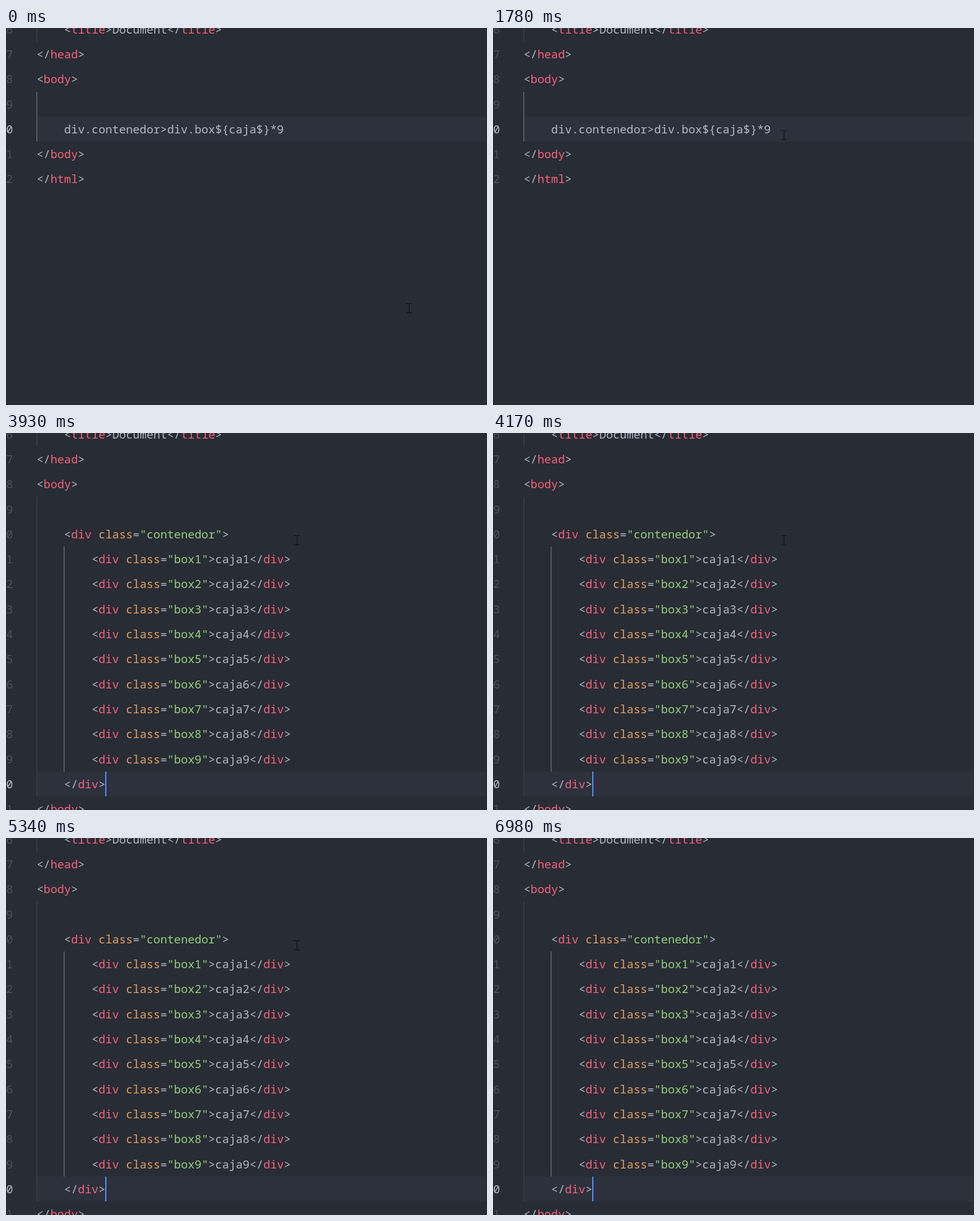
An HTML page with a canvas for the animation above (7030 ms loop, 776 by 608 pixels).

```html
<!DOCTYPE html>
<html lang="es">
<head>
<meta charset="utf-8">
<title>Editor</title>
<style>
  html, body { margin: 0; width: 776px; height: 608px; overflow: hidden; background: #282c34; }
  canvas { display: block; }
</style>
</head>
<body>
<canvas id="stage" width="776" height="608"></canvas>
<script>
const ctx = document.getElementById('stage').getContext('2d');
const W = 776, H = 608, LOOP = 7030;
const LEFT = 49.5, CHAR = 11.08, ROW = 40.3, SIZE = CHAR / 0.6;
const FONT = '"Noto Sans Mono", "DejaVu Sans Mono", monospace';
const POPUP_AT = 3100, EXPAND_AT = 3900, BLINK = 500;
const COLOR = {
  back: '#282c34', row: '#2c313c', plain: '#b2b9c6', tag: '#f4627a',
  attr: '#e2a066', string: '#94d07f', number: '#495162', active: '#b8bec9',
  guide: '#3b4048', guideOn: '#656a73', caret: '#528bff', popup: '#21252b'
};
const ABBR = 'div.contenedor>div.box${caja$}*9';

const rowTop = n => Math.round(143 + ROW * (n - 10));
const baseline = n => Math.round(169.85 + ROW * (n - 10));
const colX = c => LEFT + CHAR * c;

function rect(x, y, w, h, color) {
  ctx.fillStyle = color;
  ctx.fillRect(x, y, w, h);
}

function text(str, x, y, color, weight = 500) {
  ctx.font = `${weight} ${SIZE}px ${FONT}`;
  ctx.fillStyle = color;
  ctx.fillText(str, x, y);
}

// Splits markup into coloured tokens.
function code(n, col, line, markup = true) {
  if (!markup) return text(line, colX(col), baseline(n), COLOR.plain);
  const parts = line.match(/<\/?|"[^"]*"|[^<>"=\s]+|[>=]|\s+/g);
  let inTag = false, named = false;
  for (const part of parts) {
    let color = COLOR.plain;
    if (part[0] === '<') { inTag = true; named = false; }
    else if (part === '>') inTag = false;
    else if (part[0] === '"') color = COLOR.string;
    else if (inTag && part !== '=' && part.trim()) {
      color = named ? COLOR.attr : COLOR.tag;
      named = true;
    }
    text(part, colX(col), baseline(n), color);
    col += part.length;
  }
}

function guide(col, from, to, color) {
  const y = rowTop(from);
  rect(Math.floor(colX(col)), y, 1.4, rowTop(to + 1) - y, color);
}

function page(expanded) {
  const current = expanded ? 20 : 10, last = expanded ? 21 : 12;
  rect(50, rowTop(current), 724, 40, COLOR.row);
  for (let n = 6; n <= last; n++) {
    text(n % 10, 0.3, baseline(n), n === current ? COLOR.active : COLOR.number);
  }
  guide(0, 6, 6, COLOR.guide);
  guide(0, 9, current, expanded ? COLOR.guide : COLOR.guideOn);
  code(6, 4, '<title>Document</title>');
  code(7, 0, '</head>');
  code(8, 0, '<body>');
  if (expanded) {
    guide(4, 11, 19, COLOR.guideOn);
    code(10, 4, '<div class="contenedor">');
    for (let i = 1; i <= 9; i++) code(10 + i, 8, `<div class="box${i}">caja${i}</div>`);
    code(20, 4, '</div>');
    code(21, 0, '</body>');
  } else {
    code(10, 4, ABBR, false);
    code(11, 0, '</body>');
    code(12, 0, '</html>');
  }
}

function wrench() {
  ctx.beginPath();
  ctx.moveTo(470.3, 196.4);
  ctx.lineTo(466.7, 200);
  ctx.lineTo(466.7, 203.1);
  ctx.lineTo(469.8, 203.1);
  ctx.lineTo(473.3, 199.6);
  ctx.bezierCurveTo(474.6, 204, 470.8, 208, 466.2, 206.8);
  ctx.lineTo(459.6, 213.8);
  ctx.bezierCurveTo(457, 216.4, 453.2, 212.6, 455.8, 210);
  ctx.lineTo(462.7, 203.5);
  ctx.bezierCurveTo(461.4, 198.8, 465.8, 194.9, 470.3, 196.4);
  ctx.closePath();
  ctx.strokeStyle = '#d0d4dc';
  ctx.lineWidth = 1.7;
  ctx.lineJoin = 'round';
  ctx.stroke();
}

function popup() {
  ctx.save();
  ctx.shadowColor = 'rgba(0,0,0,.4)';
  ctx.shadowBlur = 5;
  ctx.shadowOffsetY = 1;
  rect(448, 184, W, 44, '#181a1f');
  ctx.restore();
  rect(449, 185, W, 42, COLOR.popup);
  rect(450, 186, W, 39, COLOR.row);
  wrench();
  text(ABBR, 480, 212, '#e2e5ea', 700);
}

function caret(t) {
  const start = t < POPUP_AT ? 150 : t < EXPAND_AT ? POPUP_AT : EXPAND_AT;
  const typing = t >= POPUP_AT && t < EXPAND_AT;
  if (t < start || (!typing && Math.floor((t - start) / BLINK) % 2)) return;
  const expanded = t >= EXPAND_AT;
  rect(Math.round(colX(expanded ? 10 : 36)) - (expanded ? 0 : 0.5), rowTop(expanded ? 20 : 10), 2, 40, COLOR.caret);
}

// Mouse path: time, x, y
const PATH = [
  [0, 650, 452], [60, 650, 452], [780, 469, 173], [5300, 469, 173],
  [5750, 449, 162], [6050, 449, 162], [6350, 452, 160], [6730, 449, 158],
  [6950, 446, -14], [LOOP, 446, -14]
];

function mouseAt(t) {
  const i = PATH.findIndex(p => p[0] > t);
  const [t0, x0, y0] = PATH[i - 1], [t1, x1, y1] = PATH[i];
  const u = (t - t0) / (t1 - t0), e = u * u * (3 - 2 * u);
  return [Math.round(x0 + (x1 - x0) * e), Math.round(y0 + (y1 - y0) * e)];
}

function mouse(t) {
  const [x, y] = mouseAt(t), ink = '#0d0f12';
  rect(x, y - 7, 1, 15, ink);
  for (const edge of [y - 8, y + 7]) {
    rect(x - 4, edge, 4, 1, ink);
    rect(x + 1, edge, 4, 1, ink);
  }
}

function draw(t) {
  rect(0, 0, W, H, COLOR.back);
  page(t >= EXPAND_AT);
  if (t >= POPUP_AT && t < EXPAND_AT) popup();
  caret(t);
  mouse(t);
}

const began = performance.now();
function tick() {
  draw((performance.now() - began) % LOOP);
  requestAnimationFrame(tick);
}
tick();
</script>
</body>
</html>
```
